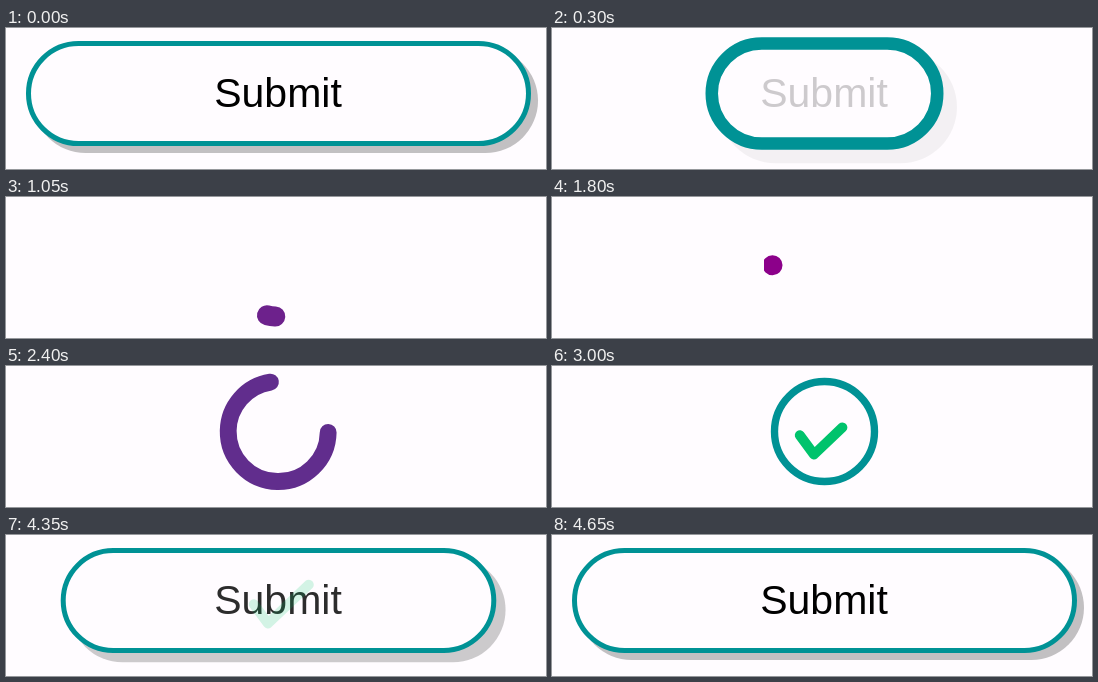
An HTML page with a canvas for the animation above (6.3 s loop, 540x141 px).

```html
<!DOCTYPE html>
<html lang="en">
<head>
<meta charset="utf-8">
<title>Submit button</title>
<style>
  html, body { margin: 0; width: 100%; height: 100%; overflow: hidden; background: #fffcff; }
  canvas { display: block; }
</style>
</head>
<body>
<canvas id="stage" width="540" height="141"></canvas>
<script>
const ctx = document.getElementById('stage').getContext('2d');
const LOOP = 6300;
const BACKGROUND = '#fffcff';
const TEAL = [0, 146, 149], PURPLE = [140, 0, 138];
const CENTER_X = 272.5, CENTER_Y = 65.5, RADIUS = 50;
const PIVOT_Y = 67.5; // the spinner turns about a point just below its centre
const SPIN_START = 600, SPIN_END = 3150;
const SPIN = [[600, 0], [1050, 183], [1320, 380], [1800, 629], [2400, 711], [2800, 720]];
const CHECK = [[247.8, 69.3], [262, 88.5], [302.8, 49.7]];

const mix = (a, b, p) => a + (b - a) * p;
const linear = (t, from, to) => Math.min(1, Math.max(0, (t - from) / (to - from)));
const smooth = (t, from, to) => {
  const x = linear(t, from, to);
  return x * x * (3 - 2 * x);
};

// cubic-bezier(.25, .1, .25, 1)
function ease(t, from, to) {
  const x = linear(t, from, to);
  let low = 0, high = 1;
  for (let i = 0; i < 24; i++) {
    const s = (low + high) / 2;
    if (0.75 * s * (1 - s) + s ** 3 < x) low = s; else high = s;
  }
  const s = (low + high) / 2;
  return 0.3 * (1 - s) ** 2 * s + 3 * (1 - s) * s * s + s ** 3;
}

// Smooth curve through [time, value] points, at rest at both ends
function track(points, t) {
  const last = points.length - 1;
  if (t <= points[0][0]) return points[0][1];
  if (t >= points[last][0]) return points[last][1];
  const i = points.findIndex(p => p[0] > t) - 1;
  const slope = k => k === 0 || k === last ? 0 :
    (points[k + 1][1] - points[k - 1][1]) / (points[k + 1][0] - points[k - 1][0]);
  const [t0, a] = points[i], [t1, b] = points[i + 1];
  const span = t1 - t0, x = (t - t0) / span, y = 1 - x;
  return y * y * (1 + 2 * x) * a + x * x * (3 - 2 * x) * b
    + span * x * y * (y * slope(i) - x * slope(i + 1));
}

function pill(width, grow, offset) {
  const w = width + grow, h = 2 * RADIUS + grow;
  ctx.beginPath();
  ctx.roundRect(CENTER_X - w / 2 + offset, CENTER_Y - h / 2 + offset, w, h, h / 2);
}

function drawButton(t) {
  const closing = t < SPIN_START;
  const shrink = closing ? ease(t, 150, 525) : 1 - ease(t, 4020, 4650);
  const fade = closing ? ease(t, 0, 600) : 1 - ease(t, 4020, 4650);
  const thick = closing ? linear(t, 0, 600) : 0;
  const stroke = mix(5, 20, thick);
  const offset = mix(7, 20, closing ? thick : fade);
  const width = mix(500, 100, shrink);

  pill(width, stroke, offset);
  ctx.fillStyle = `rgba(0,0,0,${0.24 * (1 - fade)})`;
  ctx.fill();
  pill(width, 0, 0);
  ctx.fillStyle = BACKGROUND;
  ctx.fill();
  ctx.strokeStyle = `rgb(${TEAL})`;
  ctx.lineWidth = stroke;
  ctx.stroke();

  ctx.fillStyle = `rgba(0,0,0,${1 - fade})`;
  ctx.font = '41px "Liberation Sans", Arial, sans-serif';
  ctx.textAlign = 'center';
  ctx.fillText('Submit', 272, 79);
}

function drawSpinner(t) {
  const tint = smooth(t, 600, 1250) - smooth(t, 2050, 3000);
  const opening = t >= 1800;
  const full = 2 * Math.PI;
  const length = full * (opening ? smooth(t, 1800, 2720) : 1 - smooth(t, 600, 1100));
  const arc = Math.max(0.002, length);
  const start = (opening ? full - arc : 0) - Math.PI / 2;

  ctx.save();
  ctx.beginPath();
  ctx.rect(212, 0, 328, 141);
  ctx.clip();
  ctx.translate(CENTER_X, PIVOT_Y);
  ctx.rotate(track(SPIN, t) * Math.PI / 180);
  ctx.beginPath();
  ctx.arc(0, CENTER_Y - PIVOT_Y, RADIUS, start, start + arc);
  ctx.strokeStyle = `rgb(${TEAL.map((c, i) => Math.round(mix(c, PURPLE[i], tint)))})`;
  ctx.lineWidth = mix(20, 5, linear(t, 2200, SPIN_END));
  ctx.stroke();
  ctx.restore();
}

function drawCheck(t) {
  const drawn = smooth(t, 2650, SPIN_END);
  const alpha = 1 - ease(t, 4020, 4650);
  if (drawn === 0 || alpha <= 0) return;
  const [a, b, c] = CHECK;
  const total = Math.hypot(b[0] - a[0], b[1] - a[1]) + Math.hypot(c[0] - b[0], c[1] - b[1]);
  ctx.save();
  ctx.globalAlpha = alpha;
  ctx.setLineDash([total * drawn, total * 2]);
  ctx.beginPath();
  CHECK.forEach(p => ctx.lineTo(...p));
  ctx.strokeStyle = '#00c36c';
  ctx.lineWidth = 10;
  ctx.stroke();
  ctx.restore();
}

function draw(t) {
  ctx.fillStyle = BACKGROUND;
  ctx.fillRect(0, 0, 540, 141);
  if (t >= SPIN_START && t < SPIN_END) drawSpinner(t);
  else drawButton(t);
  drawCheck(t);
}

ctx.lineCap = ctx.lineJoin = 'round';
const begin = performance.now();
function frame() {
  draw((performance.now() - begin) % LOOP);
  requestAnimationFrame(frame);
}
frame();
</script>
</body>
</html>
```
